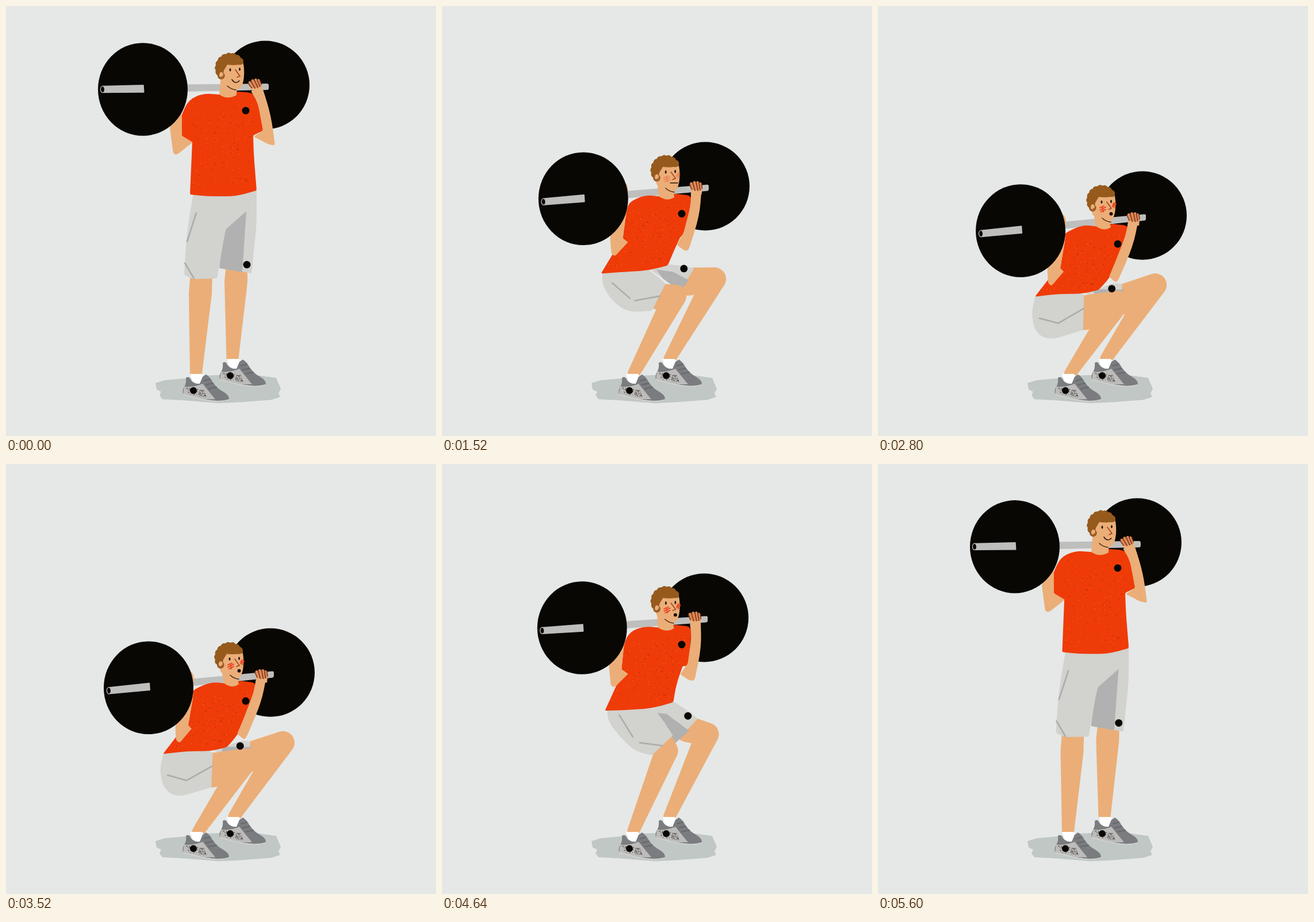
These frames come from a looping animation (748x748 px, 6160 ms). An HTML page:

```html
<!DOCTYPE html>
<html lang="en">
<head>
<meta charset="utf-8">
<title>Barbell squat</title>
<style>
html, body { margin: 0; width: 100%; height: 100%; overflow: hidden; background: #e5e8e7; }
svg { display: block; width: 100vw; height: 100vh; }
</style>
</head>
<body>
<svg viewBox="0 0 748 748" xmlns="http://www.w3.org/2000/svg">
  <defs>
    <g id="shoe">
      <path fill="#fff" d="M320 640L341 640L345 645L338 660L325 658Z"/>
      <path fill="#7a7c7f" d="M313 647Q318 643 321 650Q327 658 337 657L342 645L348 641Q355 645 360 655Q368 666 378 671Q388 677 388 683Q386 688 372 688L345 684L308 676Q306 668 311 661Q314 655 313 647Z"/>
      <path fill="#bdbcba" d="M310 662Q326 664 342 657L350 667L364 684L345 684L308 676Z"/>
      <path class="grit" fill="none" stroke="#3b3a39" stroke-width="1.2" stroke-linecap="round"/>
      <path fill="none" stroke="#606367" stroke-width="1.5" d="M344 652L355 649M347 659L361 656M352 666L367 663"/>
      <path fill="none" stroke="#d4d5d2" stroke-width="1.6" d="M308 676L345 685Q372 690 387 685"/>
      <circle cx="326" cy="669" r="6" fill="#080703"/>
    </g>
  </defs>
  <rect width="748" height="748" fill="#e5e8e7"/>
  <path fill="#c0c7c5" d="M260 656L276 651L310 648L345 643L420 640L470 647L478 666L474 674L477 680L462 685L410 689L370 691L310 686L272 684L267 677L270 671L262 667Z"/>
  <ellipse id="plateR" rx="77" ry="77" fill="#080703"/>
  <path id="bar" fill="#bebebc"/>
  <ellipse id="handL" rx="8" ry="14" fill="#ebae78"/>
  <path id="legR" fill="#ebae78"/>
  <path id="far" fill="#d2d2ce"/>
  <path id="shade" fill="#b0b1b0"/>
  <path id="legL" fill="#ebae78"/>
  <path id="near" fill="#d2d2ce"/>
  <path id="seam" fill="none" stroke="#abacab" stroke-width="2.6" stroke-linecap="round"/>
  <circle id="badgeS" r="6.5" fill="#080703"/>
  <use href="#shoe" x="64" y="-26"/>
  <use href="#shoe"/>
  <path id="shirt" fill="#ef3b08"/>
  <path id="fleckD" fill="none" stroke="#7d2a10" stroke-width="1.3" stroke-linecap="round"/>
  <path id="fleckL" fill="none" stroke="#f5803a" stroke-width="1.1" stroke-linecap="round"/>
  <circle id="badgeC" r="6.5" fill="#080703"/>
  <path id="neck" fill="#ebae78"/>
  <g id="head">
    <path fill="#ebae78" d="M374 98L412 96Q415 108 414 122Q413 137 407 143Q400 148 391 144L375 134Q370 124 374 98Z"/>
    <g id="hair" fill="#965a1d">
      <path d="M368 118L372 96Q390 84 408 92L413 101Q395 104 385 102L379 112L376 126Z"/>
    </g>
    <ellipse cx="374.5" cy="120" rx="3.5" ry="5" fill="#ebae78"/>
    <path fill="none" stroke="#8a4a22" stroke-width="1.2" d="M373 123Q376 126 377 121"/>
    <path id="cheeks" fill="none" stroke="#ee4526" stroke-width="2" stroke-linecap="round" d="M387 121L394 118M387 125L397 120M389 128L397 124M391 119L393 128M409 116L414 112M409 119L415 115M411 113L412 121"/>
    <ellipse cx="390" cy="111" rx="1.5" ry="2.8" fill="#221711"/>
    <ellipse cx="406.5" cy="110" rx="1.5" ry="2.8" fill="#221711"/>
    <path fill="none" stroke="#a8401c" stroke-width="1.6" stroke-linecap="round" d="M399 111L407 122L402 124"/>
    <path id="mouth" fill="none" stroke="#2a150c" stroke-width="1.6" stroke-linecap="round"/>
    <circle id="puff" cx="406.5" cy="131.5" r="3" fill="#1b0f0a"/>
    <path id="jaw" fill="none" stroke="#4a2413" stroke-width="1.4" stroke-linecap="round" d="M385 139Q391 145 400 146"/>
  </g>
  <path id="armL" fill="#ebae78"/>
  <path id="armR" fill="#ebae78"/>
  <g id="handR">
    <path fill="#ebae78" d="M-10 4Q-8 -5 0 -6Q10 -5 11 4L10 14L-5 14Z"/>
    <path fill="none" stroke="#dd8a57" stroke-width="4.6" stroke-linecap="round" d="M-8 -5L-4 4M-2.5 -7L1 5M3 -7L5.5 5M7.5 -5L9 4"/>
    <path fill="none" stroke="#78301a" stroke-width="1.5" stroke-linecap="round" d="M-11 -4L-7 5M-5.5 -7L-1.5 7M.5 -8L3.5 7M5.5 -7L7.5 6M10 -5L11 3"/>
  </g>
  <ellipse id="plateL" rx="78" ry="80.8" fill="#080703"/>
  <path id="stub" fill="#bebebc"/>
  <ellipse id="cap" rx="3.6" ry="5.6" fill="#080703" stroke="#bebebc" stroke-width="1.3"/>
</svg>
<script>
const LOOP = 6160, STEP = 40, DEEP = 226;
const $ = id => document.getElementById(id);
const set = (id, d) => $(id).setAttribute('d', d);
const move = (id, [x, y], turn = 0) =>
  $(id).setAttribute('transform', `translate(${x} ${y}) rotate(${turn})`);
const clamp = v => Math.max(0, Math.min(1, v));
const ramp = (t, a, b) => clamp((t - a) / (b - a));

// Time and depth of the squat: slow descent, hold, push up past the top, settle
const keys = [[120, 0], [720, 56], [1360, 157], [2000, 213], [2960, 227],
  [3920, 213], [4560, 144], [5200, -1], [5360, -8], [5600, -1]];

function depthAt(t) {
  const n = keys.length - 1;
  if (t <= keys[0][0]) return keys[0][1];
  if (t >= keys[n][0]) return keys[n][1];
  const slope = i => {
    const a = keys[Math.max(0, i - 1)], b = keys[Math.min(n, i + 1)];
    return (b[1] - a[1]) / (b[0] - a[0]);
  };
  const i = keys.findIndex(k => k[0] > t) - 1;
  const [t0, d0] = keys[i], [t1, d1] = keys[i + 1];
  const h = t1 - t0, u = (t - t0) / h, v = 1 - u;
  return v * v * (1 + 2 * u) * d0 + u * u * (3 - 2 * u) * d1
    + h * u * v * (v * slope(i) - u * slope(i + 1));
}

// Bend runs from 0 (standing) to 1 (deepest). A point travels by (dx, dy)
// along an arc that bulges by (bx, by) half way.
let bend = 0;
const p = (x, y, dx = 0, dy = 0, bx = 0, by = 0) => {
  const arc = 4 * bend * (1 - bend);
  return [x + dx * bend + bx * arc, y + dy * bend + by * arc];
};

const xy = ([x, y]) => x.toFixed(2) + ' ' + y.toFixed(2);
const toward = (a, b, k) => [a[0] + (b[0] - a[0]) * k, a[1] + (b[1] - a[1]) * k];
const shift = ([x, y], dx, dy) => [x + dx, y + dy];

// Closed polygon with one corner radius per vertex
function soft(pts, radii) {
  const n = pts.length;
  const cut = (a, b, r) => {
    const len = Math.hypot(b[0] - a[0], b[1] - a[1]) || 1;
    return toward(a, b, Math.min(r / len, .5));
  };
  return pts.map((q, i) => {
    const a = cut(q, pts[(i + n - 1) % n], radii[i]), b = cut(q, pts[(i + 1) % n], radii[i]);
    return (i ? 'L' : 'M') + xy(a) + 'Q' + xy(q) + ' ' + xy(b);
  }).join('') + 'Z';
}

// Tapered limb: the outline around two circles
function limb(a, ra, b, rb) {
  const dist = Math.hypot(b[0] - a[0], b[1] - a[1]);
  const dir = Math.atan2(b[1] - a[1], b[0] - a[0]);
  const open = Math.acos(Math.max(-1, Math.min(1, (ra - rb) / dist)));
  const rim = (c, r, s) => xy([c[0] + r * Math.cos(dir + s * open), c[1] + r * Math.sin(dir + s * open)]);
  const wide = open > Math.PI / 2 ? 1 : 0;
  return `M${rim(a, ra, 1)}L${rim(b, rb, 1)}A${rb} ${rb} 0 ${wide} 0 ${rim(b, rb, -1)}`
    + `L${rim(a, ra, -1)}A${ra} ${ra} 0 ${1 - wide} 0 ${rim(a, ra, 1)}Z`;
}
const leg = (ankle, knee, hip, rHip) => limb(ankle, 10.5, knee, 20) + limb(knee, 20, hip, rHip);

let seed = 7;
const rand = () => (seed = seed * 16807 % 2147483647) / 2147483647;
const flecks = n => Array.from({ length: n }, () => [.05 + rand() * .88, .03 + rand() * .94]);
const dot = q => 'M' + xy(q) + 'h.1';
const scatter = (list, tl, tr, bl, br) =>
  list.map(([u, v]) => dot(toward(toward(tl, tr, u), toward(bl, br, u), v))).join('');

const darkFlecks = flecks(55), lightFlecks = flecks(80);
document.querySelector('.grit').setAttribute('d',
  flecks(75).map(([u, v]) => dot([311 + u * 37 + v * 4, 663 + u * 5 + v * 13])).join(''));

for (let i = 0; i < 10; i++) {
  const a = (140 + i * 20.5) * Math.PI / 180;
  $('hair').innerHTML += `<circle cx="${390 + 20.5 * Math.cos(a)}" cy="${108 + 20.5 * Math.sin(a)}" r="6.3"/>`;
}

function drawBarbell() {
  const left = p(238, 145, 10, 245), a = p(168, 145, 11, 250, 0, 2), b = p(457, 140.5, 9, 226);
  move('plateL', left);
  move('plateR', p(451, 137.5, 9, 226, 0, .8));
  move('handL', shift(left, 66 + 5 * bend, -15));
  move('cap', a);
  const along = (k, dy) => shift(toward(a, b, k), 0, dy);
  set('bar', soft([along(.3, -6.6), along(1, -5.5), along(1, 5.5), along(.3, 6.6)], [0, 3, 3, 0]));
  set('stub', soft([along(0, -6.2), along(.248, -6.8), along(.251, 6.8), along(0, 6.2)], [0, 1, 1, 0]));
}

function drawLegs() {
  set('legL', leg(p(330.5, 639, 4), p(338, 500, 80, 15, 7, -10),
    p(340, 465, 18, 68, 35, -17), 19 + 11 * bend ** 4));
  set('legR', leg(p(394, 613, 3), p(400, 480, 82, 5, 15, -13),
    p(401, 460, 24, 50, 13, -28), 19 + 7 * Math.abs(bend)));
}

function drawShorts() {
  const hem = p(371, 456, 52, 50, 4, 2), inner = p(377, 405, 0, 100, 11, -12);
  set('far', soft([p(380, 326, -21, 172), p(436, 319, -52, 173, -4, -5), p(436, 380, -28, 101, 6, -10),
    p(427, 465, -2, 18, 19, -33), hem, inner], [0, 0, 20, 1, 1, 6]));
  set('shade', soft([p(383, 388, -8, 104, -6, -15), p(418, 357, 10, 136, -34, 0),
    p(411, 463, 13, 36, 12, -20), hem, inner], [0, 0, 0, 0, 0]));
  set('near', soft([p(326, 326, -52, 177, -9, 0), p(318, 372, -51, 160, 0, -16),
    p(313, 415, -40, 150, 21, -25), p(310, 468, -13, 113, 35, -33), p(326, 475, 31, 88, 22, -19),
    p(367, 474, -8, 29, 40, -19), p(378, 410, -19, 92, 20, -13), p(395, 328, -45, 170)],
    [2, 20, 26, 4 + 16 * clamp(bend * 2), 2, 1, 8, 0]));
  const seams = [[p(331, 360, -50, 182, 6, -28), p(315, 410, -1, 141, 18, -16)],
    [p(311, 447, 3, 104, 32, -22), p(327, 474, 31, 52, 40, -14)]];
  set('seam', seams.map(([a, b]) => 'M' + xy(a) + 'L' + xy(b)).join(''));
  move('badgeS', p(419, 450, -12, 41, 16, -36));
}

function drawShirt() {
  const collarL = p(371, 154, 8, 228), collarR = p(404, 149, 4, 229);
  const shoulderL = p(318, 163, 6, 231, 5, -3), shoulderR = p(440, 164, -6, 228, -3, 0);
  const hemL = p(320, 328, -47, 177, -10, 0), hemR = p(436, 321, -52, 172, -4, -5);
  const back = [collarL, p(343, 152, 13, 228), shoulderL, p(304, 192, 22, 210), p(306, 226, 11, 229),
    p(324, 237, -24, 233), hemL];
  const front = [p(350, 331, -35, 169), p(400, 331, -44, 169, -8, -3), hemR, p(431, 260, -33, 218, -5, 0),
    p(430, 225, -20, 235, 0, -8), p(447, 217, -29, 223, -2, 7), shoulderR, p(428, 151, 6, 230), collarR];
  set('shirt', soft([...back, ...front], [0, 14, 14, 12, 2, 2, 3, 16, 16, 3, 24, 2, 2, 14, 8, 0]));
  set('fleckD', scatter(darkFlecks, shoulderL, shoulderR, hemL, hemR));
  set('fleckL', scatter(lightFlecks, shoulderL, shoulderR, hemL, hemR));
  move('badgeC', p(417, 182, 0, 231));
  const head = p(0, 0, -1, 229);
  set('neck', 'M' + xy(shift(head, 374, 120)) + 'L' + xy(collarL)
    + 'Q' + xy(shift(collarL, 14, 10)) + ' ' + xy(shift(collarR, -3, 6))
    + 'L' + xy(shift(head, 402, 138)) + 'Z');
  move('head', head);
}

function drawArms() {
  set('armL', soft([p(306, 186, 20, 214), p(306, 226, 11, 229), p(325, 237, -2, 224), p(297, 259, 5, 227),
    p(291, 257, 5, 225), p(284, 205, 10, 248), p(300, 180, 10, 215)], [0, 1, 1, 4, 4, 12, 0]));
  set('armR', soft([p(426, 148, 9, 226), p(438, 168, -7, 230), p(447, 217, -34, 227), p(431, 227, -29, 243),
    p(455, 240, -41, 240), p(468, 243, -50, 233), p(461, 190, -17, 226), p(446, 142, 7, 229)],
    [2, 14, 2, 2, 4, 5, 30, 3]));
  move('handR', p(433, 136, 11, 231, 0, -2), -14 * clamp(1 - bend * 3));
}

function drawFace(t) {
  const down = t < 3000, open = t >= 2000 && t < 5000;
  const grin = down ? 1 - ramp(t, 960, 1480) : ramp(t, 5000, 5240);
  const x = 398 - 5 * grin;
  set('mouth', `M${x} ${130 - 2 * grin}Q${x + 6} ${130 + 7 * grin} ${x + 13} 130`);
  $('mouth').style.opacity = open ? 0 : 1;
  $('puff').style.opacity = open ? 1 : 0;
  $('cheeks').style.opacity = down ? ramp(t, 1100, 2200) : 1 - ramp(t, 4640, 5240);
  move('jaw', [6 * bend, 0]);
}

function draw(t) {
  bend = depthAt(t) / DEEP;
  drawBarbell();
  drawLegs();
  drawShorts();
  drawShirt();
  drawArms();
  drawFace(t);
}

const start = performance.now();
function tick() {
  const t = (performance.now() - start) % LOOP;
  draw(Math.floor(t / STEP) * STEP);
  requestAnimationFrame(tick);
}
tick();
</script>
</body>
</html>
```
